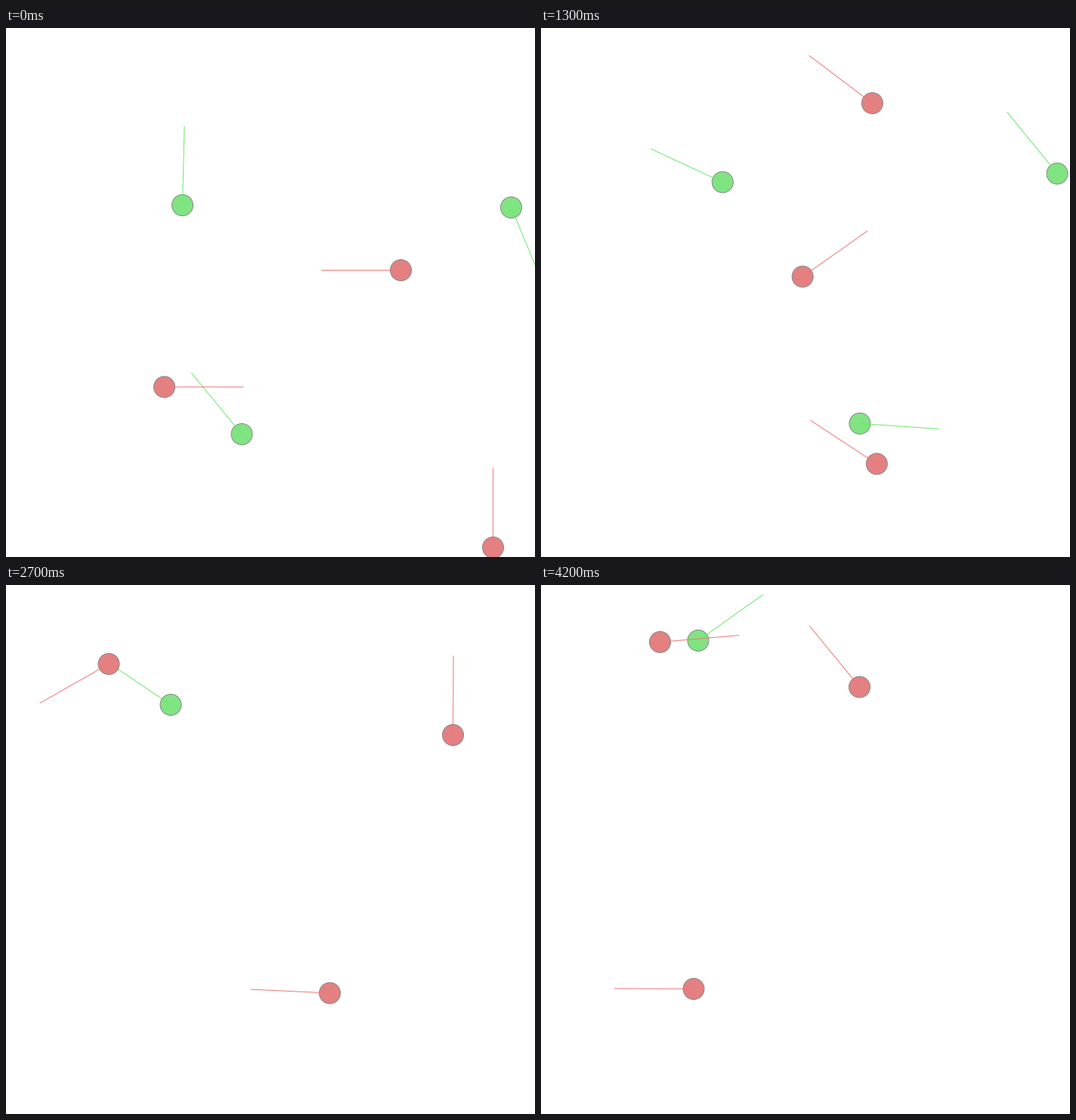
A matplotlib script for the animation above (4.3 s loop, 700 by 700 pixels).

```python
import numpy as np
import matplotlib.pyplot as plt
from matplotlib.animation import FuncAnimation
from matplotlib.patches import Circle

SIZE, DPI = 700, 100
FRAMES, INTERVAL = 43, 100
RADIUS, SIGHT = 14, 105
PX = 72 / DPI

PREY = ("#80e482", "#6be86b")
HUNTER = ("#e48081", "#f07777")

# All creatures share the same stops; each waypoint is x, y, heading in degrees
STOPS = np.array([0, 9, 16, 20, 27, 36, 42])
PREY_PATHS = [
    [(233, 234, 88.6), (241, 212.5, 164.8), (237, 196, 147.9), (230.5, 184, 99.9),
     (217.5, 158, 146), (204.5, 80.5, 92), (207.5, 73, 35.3)],
    [(668, 237, -67.4), (696, 212.5, 60), (670, 180, 181.1), (660, 177, 99.3),
     (654, 172, 10)],
    [(311.5, 537, 129.4), (374, 530, 6), (454.5, 518, -11.3), (482, 515, -20)],
]
EATEN_AT = [FRAMES, 26, 18]
HUNTER_PATHS = [
    [(522, 320, 180), (497, 151, 106), (382, 78, 170.7), (302, 85, 186.3),
     (135.5, 104, 209.6), (163.5, 92.5, 500.4), (157, 75, 724.9)],
    [(209, 474.5, 0), (279.5, 367, 32.5), (405, 304.5, 37.1), (491.5, 280.5, 8.8),
     (591, 198, 89.7), (462, 152, 166.2), (421, 134.5, 129.3)],
    [(644, 687, 90), (533, 604, 167), (400, 560, 131.5), (422.5, 545.5, 25),
     (428, 539.5, 177.3), (298, 536.5, 177.5), (201.5, 534, 179.7)],
]


def glide(step, times, values):
    """Smooth cubic curve through the waypoints."""
    slopes = np.gradient(values, times)
    i = int(np.clip(np.searchsorted(times, step, "right") - 1, 0, len(times) - 2))
    h = times[i + 1] - times[i]
    u = (step - times[i]) / h
    a, b = values[i], values[i + 1]
    return (a + (b - a) * u * u * (3 - 2 * u)
            + h * slopes[i] * u * (1 - u) ** 2
            - h * slopes[i + 1] * u * u * (1 - u))


class Creature:
    def __init__(self, ax, path, colors, z, end=FRAMES):
        self.xs, self.ys, self.angles = np.array(path, float).T
        self.times = STOPS[:len(path)]
        self.end = end
        fill, stroke = colors
        self.body = Circle((0, 0), RADIUS, fc=fill, ec="#888888", lw=PX, zorder=z)
        ax.add_patch(self.body)
        self.ray, = ax.plot([], [], color=stroke, lw=PX, zorder=z + 0.5,
                            snap=False, solid_capstyle="butt")

    def update(self, step):
        alive = step < self.end
        self.body.set_visible(alive)
        self.ray.set_visible(alive)
        if not alive:
            return
        x = glide(step, self.times, self.xs)
        y = glide(step, self.times, self.ys)
        angle = np.radians(np.interp(step, self.times, self.angles))
        self.body.center = (x, y)
        self.ray.set_data([x, x + SIGHT * np.cos(angle)],
                          [y, y - SIGHT * np.sin(angle)])


fig = plt.figure(figsize=(SIZE / DPI, SIZE / DPI), dpi=DPI, facecolor="white")
ax = fig.add_axes([0, 0, 1, 1])
# Whole numbers fall on pixel centres
ax.set_xlim(-0.5, SIZE - 0.5)
ax.set_ylim(SIZE - 0.5, -0.5)
ax.set_autoscale_on(False)
ax.axis("off")

creatures = [Creature(ax, path, PREY, 2 + i, end)
             for i, (path, end) in enumerate(zip(PREY_PATHS, EATEN_AT))]
creatures += [Creature(ax, path, HUNTER, 5 + i)
              for i, path in enumerate(HUNTER_PATHS)]


def draw(step):
    for creature in creatures:
        creature.update(step)
    return []


anim = FuncAnimation(fig, draw, frames=FRAMES, interval=INTERVAL,
                     init_func=lambda: draw(0), repeat=True, blit=False)
plt.show()
```
